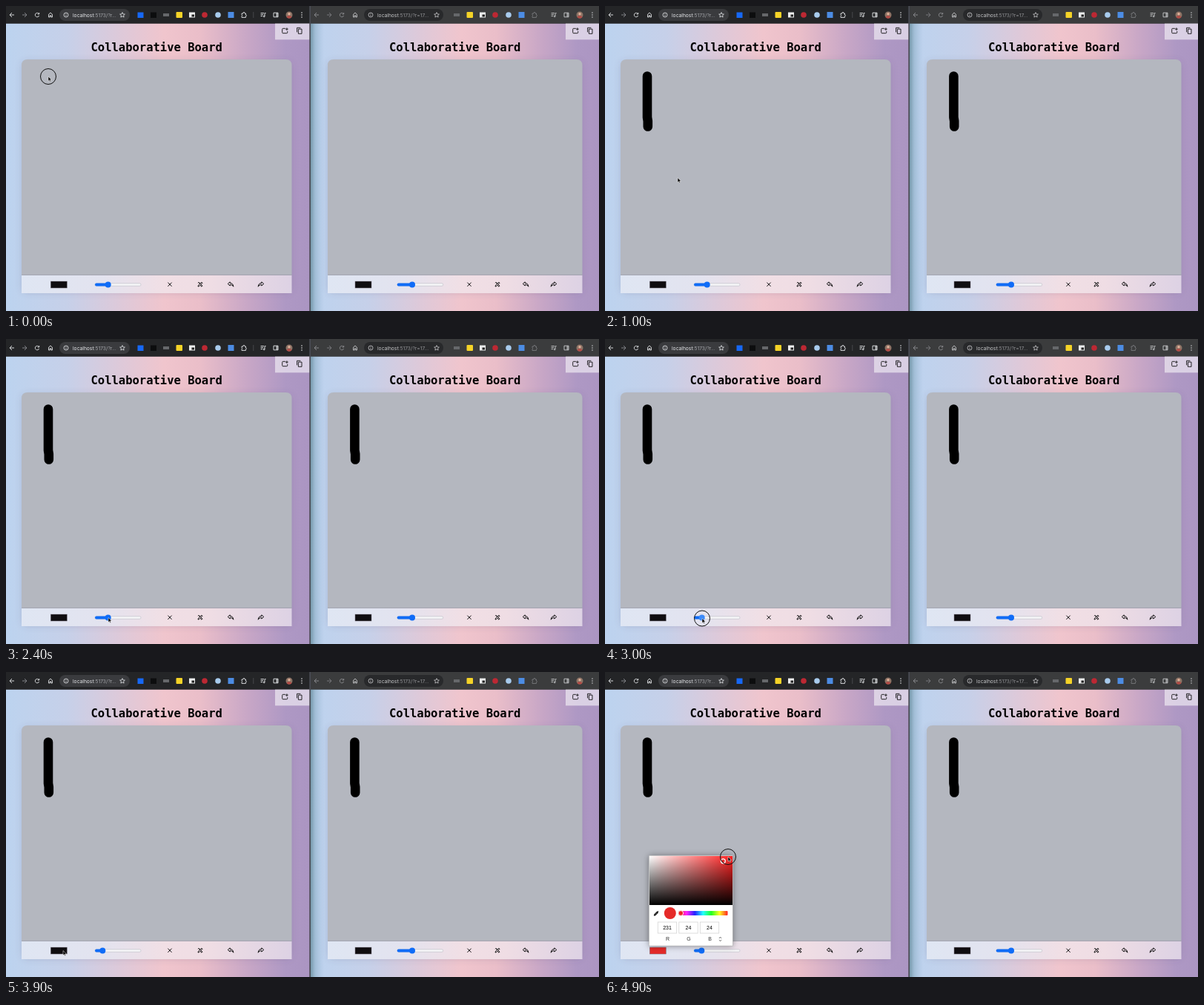
Write an HTML page that moves like this. It is 800 px wide and 411 px high and loops after 5 s.

```html
<!DOCTYPE html>
<html lang="en">
<head>
<meta charset="utf-8">
<title>Collaborative Board</title>
<style>
  html, body { margin: 0; width: 100%; height: 100%; overflow: hidden; background: #202124; }
  svg { display: block; width: 800px; height: 411px; }
  .title { font: bold 15.5px "DejaVu Sans Mono", monospace; text-anchor: middle; }
  .url { font: 6.7px Inter, sans-serif; }
  .field { font: 7px "Liberation Sans", Arial, sans-serif; text-anchor: middle; }
</style>
</head>
<body>
<svg id="stage" viewBox="0 0 800 411" xmlns="http://www.w3.org/2000/svg"></svg>
<script>
const ICONS = {
  back: 'M3 0H-3M0 -3L-3 0L0 3',
  forward: 'M-3 0H3M0 -3L3 0L0 3',
  reload: 'M2.4 -1.3A2.7 2.7 0 1 0 2.6 1M2.7 -3V-1H.7',
  home: 'M-2.4 3V-.8L0 -3L2.4 -.8V3H.8V.8H-.8V3Z',
  info: 'M-3 0A3 3 0 1 1 3 0A3 3 0 1 1 -3 0M0 -.3V1.7M0 -1.7V-1',
  star: 'M0 -3.4L1 -1.1L3.4 -.9L1.6 .7L2.1 3.1L0 1.8L-2.1 3.1L-1.6 .7L-3.4 -.9L-1 -1.1Z',
  puzzle: 'M-3 -2H-1V-2.6A1 1 0 0 1 1 -2.6V-2H2.4V0H2.8A1 1 0 0 1 2.8 1.8H2.4V3.4H-3V1.6A1 1 0 0 0 -3 -.2Z',
  media: 'M-3.4 -2.4H1M-3.4 -.4H0M-3.4 1.6H-1M2 2V-2.4H3.6M2 2A.9 .9 0 1 1 1.9 1.5',
  panel: 'M-3 -2.8H3V2.8H-3ZM1 -2.8V2.8M2 -2.8V2.8',
  close: 'M-2.6 -2.6L2.6 2.6M2.6 -2.6L-2.6 2.6',
  design: 'M-3 2.8L-2.4 1L2 -3L3 -2L-1.4 2.4ZM-3 -2L-2 -3L-.2 -1.2M1.3 .4L3 2L2 3L.3 1.4M-2 -1.2L-1.4 -1.8M1.6 2L2.2 1.4',
  undo: 'M-3.8 -.8L-.8 -3.4V-1.8C2 -1.8 3.6 -.2 3.8 3C2.8 1 1.4 .4 -.8 .4V1.8Z',
  redo: 'M3.8 -.8L.8 -3.4V-1.8C-2 -1.8 -3.6 -.2 -3.8 3C-2.8 1 -1.4 .4 .8 .4V1.8Z',
  share: 'M.6 -3H-2.6Q-3.6 -3 -3.6 -2V2.4Q-3.6 3.4 -2.6 3.4H2.4Q3.4 3.4 3.4 2.4V.6M2.6 -4V-.4M.8 -2.2H4.4',
  copy: 'M-1.6 -2.2H3V4H-1.6ZM-3.4 2V-4H1.4',
  dropper: 'M-3 3L-2.6 1.6L.6 -1.6L1.6 -.6L-1.6 2.6ZM.2 -2L2 -.2M1 -1.2L2.4 -2.6'
};

const icon = (name, x, y, color = '#111', width = .9) =>
  `<path d="${ICONS[name]}" transform="translate(${x} ${y})" fill="none" stroke="${color}" stroke-width="${width}" stroke-linejoin="round"/>`;
const rect = (x, y, w, h, fill, extra = '') =>
  `<rect x="${x}" y="${y}" width="${w}" height="${h}" fill="${fill}" ${extra}/>`;
const circle = (x, y, r, fill, extra = '') =>
  `<circle cx="${x}" cy="${y}" r="${r}" fill="${fill}" ${extra}/>`;
const text = (cls, x, y, body, fill = '#000') =>
  `<text class="${cls}" x="${x}" y="${y}" fill="${fill}">${body}</text>`;
const gradient = (id, colors, dir = '') =>
  `<linearGradient id="${id}" ${dir}>${colors.map(([at, c, o = 1]) =>
    `<stop offset="${at}" stop-color="${c}" stop-opacity="${o}"/>`).join('')}</linearGradient>`;

function browserBar(p) {
  const { x, w, pillW, ink, dim } = p;
  const end = x + w;
  let s = rect(x, 0, w, 23.5, p.bar);
  s += icon('back', x + 8, 12, p.navInk) + icon('forward', x + 25, 12, dim);
  s += icon('reload', x + 42, 12, p.navInk) + icon('home', x + 60, 12, ink);
  s += rect(x + 72, 4, pillW, 16, p.pill, 'rx="8"');
  s += icon('info', x + 81, 12, ink, .8);
  s += text('url', x + 90, 14.6, `localhost<tspan fill="${p.pathInk}">${p.path}</tspan>`, ink);
  s += icon('star', x + 64 + pillW + 21 - p.starShift, 12, ink, .8);

  const ext = p.ext;
  if (p.active) s += rect(177.5, 8.5, 8, 7.5, '#1668f5') + rect(195, 8.5, 8, 7.5, '#0c0d0e');
  s += rect(ext - 4, 10, 8, 4, '#66686b');
  s += rect(ext + 13.5, 8, 8.5, 8, '#f5d327', 'rx="1"');
  s += rect(ext + 31, 8.5, 8, 7, '#eceded') + rect(ext + 34.5, 11.5, 3.5, 3, '#222');
  s += circle(ext + 52, 12, 3.8, '#bd2833');
  s += circle(ext + 70, 12, 3.8, '#a8cbed');
  s += rect(ext + 83.5, 8, 8, 8, '#4c8ce4');
  s += icon('puzzle', ext + 105, 12, p.active ? ink : dim);
  if (p.active) s += rect(333.5, 8, .7, 8, '#55575b');
  s += icon('media', end - 63, 12, ink) + icon('panel', end - 46, 12, ink);
  s += circle(end - 28, 12, 4.5, '#8d7466') + circle(end - 28, 10.7, 1.7, '#e2b29b') +
       `<path d="M${end - 31.5} 15A3.7 3 0 0 1 ${end - 24.5} 15A4.5 4.5 0 0 1 ${end - 31.5} 15Z" fill="#b14b46"/>`;
  for (const y of [9, 12, 15]) s += circle(end - 11, y, .8, ink);
  return s;
}

function pane(p) {
  const { x, w, boardX: bx, boardW: bw, tools } = p;
  let s = rect(x, 23.5, w, 388, 'url(#page)');
  if (!p.active) s += rect(x, 23.5, 18, 388, 'url(#edge)');
  s += browserBar(p);
  s += rect(p.shareX, 23.5, x + w - p.shareX, 21.8, '#fff', 'fill-opacity=".55"');
  s += icon('share', p.shareX + 13.3, 33.3) + icon('copy', p.shareX + 33, 33.3);
  s += text('title', p.titleX, 61, 'Collaborative Board');
  s += rect(bx, 74, bw, 313, '#554c70', 'rx="8" fill-opacity=".2" filter="url(#soft)"');
  s += rect(bx, 363, bw, 24, 'url(#tray)');
  s += `<path d="M${bx} 362.5V80Q${bx} 72 ${bx + 8} 72H${bx + bw - 8}Q${bx + bw} 72 ${bx + bw} 80V362.5Z" fill="#b4b7bf"/>`;
  s += rect(bx, 361.8, bw, 1, '#a5a6b1');
  s += `<path id="${p.id}Line" transform="translate(${p.shift} 0)" fill="none" stroke="#000" stroke-width="12.6" stroke-linecap="round" stroke-linejoin="round"/>`;
  s += rect(p.swatchX, 371, 22, 9, '#0f0d10', `id="${p.id}Swatch" stroke="#77727c" stroke-width=".5"`);
  s += rect(p.slideX, 373.7, 62, 3.6, '#f4f4f6', 'rx="1.8" stroke="#bdbdc5" stroke-width=".6"');
  s += rect(p.slideX, 373.5, p.thumbX - p.slideX, 4, '#0f6cf7', `id="${p.id}Fill" rx="2"`);
  s += circle(p.thumbX, 375.5, 4, '#0f6cf7', `id="${p.id}Thumb"`);
  ['close', 'design', 'undo', 'redo'].forEach((n, i) => s += icon(n, tools[0] + i * tools[1], 375.2, '#111', 1));
  return s;
}

function picker() {
  let s = rect(59, 247.5, 113.5, 122, '#000', 'fill-opacity=".4" filter="url(#soft)"');
  s += rect(59.3, 247.3, 113, 121.7, '#fff', 'stroke="#aaa" stroke-width=".5"');
  s += rect(60, 248, 112, 66, 'url(#sat)') + rect(60, 248, 112, 66, 'url(#val)');
  s += circle(0, 0, 3, 'none', 'id="handle" stroke="#fff" stroke-width="1.2"');
  s += icon('dropper', 69.5, 325, '#111', 1.3);
  s += circle(87.8, 325, 8, '#000', 'id="preview"');
  s += rect(99, 322, 66.5, 6, 'url(#hue)', 'rx="1"');
  s += circle(102.2, 325, 3.4, '#ee2424', 'stroke="#fff" stroke-width=".9"');
  ['R', 'G', 'B'].forEach((c, i) => {
    const x = 84 + i * 28.5;
    s += rect(x - 12.7, 337, 25.4, 15, '#fff', 'stroke="#d5d5d5" stroke-width=".8"');
    s += `<text class="field channel" x="${x}" y="347"></text>` + text('field', x + .5, 362, c, '#333');
  });
  s += '<path d="M154 359L155.5 357L157 359M154 360.8L155.5 362.8L157 360.8" fill="none" stroke="#444" stroke-width=".7"/>';
  return `<g id="picker">${s}</g>`;
}

const left = {
  id: 'left', active: true, x: 0, w: 410, bar: '#242527', pill: '#3a3b3e', pillW: 95, starShift: 23,
  ink: '#e8eaed', navInk: '#e8eaed', dim: '#8b8d91', pathInk: '#a5a7ab', path: ':5173/?r...', ext: 216,
  shareX: 363, titleX: 203.2, boardX: 21, boardW: 364.5, shift: 0,
  swatchX: 60.3, slideX: 120, thumbX: 137.7, tools: [221, 41]
};
const right = {
  id: 'right', active: false, x: 411, w: 391, bar: '#3b3c3d', pill: '#28292b', pillW: 107, starShift: 22,
  ink: '#c9cacc', navInk: '#8f9093', dim: '#7b7c7f', pathInk: '#929396', path: ':5173/?r=17...', ext: 608,
  shareX: 755, titleX: 605.7, boardX: 434, boardW: 343.5, shift: 413.4,
  swatchX: 471, slideX: 527.7, thumbX: 548, tools: [625, 38]
};
// The address text sits slightly further left in the second window
right.x = 411;

const hues = ['#f22', '#f2f', '#22f', '#2ff', '#2f2', '#ff2', '#f22'];
const stage = document.getElementById('stage');
stage.innerHTML = `<defs>
  ${gradient('page', [[0, '#bcd3ef'], [.2, '#c6d0e9'], [.38, '#dec9d9'], [.52, '#f0c5cd'], [.64, '#eabec9'], [.8, '#c7a6c6'], [.92, '#ae98c4'], [1, '#ab95c2']])}
  ${gradient('tray', [[0, '#dfe6f3'], [.3, '#e3e3ef'], [.53, '#f1dfe5'], [.7, '#efdde4'], [1, '#ddd2e4']])}
  ${gradient('edge', [[0, '#47707c', .6], [.35, '#5b8798', .28], [1, '#7ba0b8', 0]])}
  ${gradient('sat', [[0, '#fff'], [1, '#ff2222']])}
  ${gradient('val', [[0, '#000', 0], [1, '#000']], 'x2="0" y2="1"')}
  ${gradient('hue', hues.map((c, i) => [i / 6, c]))}
  <filter id="soft" x="-20%" y="-20%" width="140%" height="140%"><feGaussianBlur stdDeviation="4"/></filter>
</defs>
${pane(right)}${pane(left)}${rect(409.3, 0, 1.7, 411, '#4a4c55')}${picker()}
${circle(0, 0, 10.5, 'none', 'id="ring" stroke="#111" stroke-width="1"')}
<path id="cursor" d="M0 0V6.2L1.5 4.9L2.5 7L3.5 6.5L2.6 4.5L4.5 4.4Z" fill="#000" stroke="#fff" stroke-width=".5"/>`;

const el = id => document.getElementById(id);
const set = (id, attrs) => { for (const k in attrs) el(id).setAttribute(k, attrs[k]); };
const show = (id, on) => set(id, { visibility: on ? 'visible' : 'hidden' });

// Pointer path: time, x, y
const PATH = [
  [0, 57, 95], [100, 57, 97], [500, 57, 150], [600, 58, 162.5], [700, 58, 162.5],
  [1000, 98, 231.5], [1900, 135.5, 365], [2300, 138, 375.5], [2500, 138, 375.5],
  [2900, 131, 376.5], [3200, 131, 376.5], [3800, 77, 375.5], [4100, 77, 375.5],
  [4300, 124.5, 293], [4700, 159, 254.5], [4900, 166, 249], [5000, 166, 249]
];
const PRESSES = [[0, 600], [2500, 3100], [4000, 4100], [4700, 5000]];

function pointer(t) {
  const i = PATH.findIndex(k => k[0] > t);
  const [t0, x0, y0] = PATH[i - 1], [t1, x1, y1] = PATH[i];
  const u = (t - t0) / (t1 - t0);
  return [x0 + (x1 - x0) * u, y0 + (y1 - y0) * u];
}

function strokeTo(t) {
  if (t < 100) return '';
  const y = t >= 600 ? 162.5 : pointer(t)[1];
  return 'M57 94.5V' + Math.min(y, 150) + (y > 150 ? `L57.8 ${Math.min(y, 155)}V${y}` : '');
}

function render(t) {
  const [x, y] = pointer(t);
  set('cursor', { transform: `translate(${x} ${y})` });
  set('ring', { cx: x, cy: y });
  show('ring', PRESSES.some(([a, b]) => t >= a && t < b));
  set('leftLine', { d: strokeTo(t) });
  set('rightLine', { d: strokeTo(t - 100) });

  const dragging = t >= 2500 && t < 3100;
  const thumb = t < 2500 ? 137.7 : dragging ? x - .3 : 130.3;
  set('leftThumb', { cx: thumb, fill: dragging ? '#3b8afa' : '#0f6cf7' });
  set('leftFill', { width: thumb - 120 });

  const picked = t >= 4800;
  const rgb = picked ? [231, 24, 24] : [0, 0, 0];
  const color = picked ? '#e52a28' : '#000';
  show('picker', t >= 4200);
  set('handle', picked ? { cx: 159.3, cy: 254.8 } : { cx: 60.5, cy: 313 });
  set('preview', { fill: color });
  set('leftSwatch', { fill: picked ? color : '#0f0d10' });
  document.querySelectorAll('.channel').forEach((n, i) => n.textContent = rgb[i]);
}

const start = performance.now();
function tick() {
  const t = Math.max(0, performance.now() - start) % 5000;
  render(Math.floor(t / 100) * 100);
  requestAnimationFrame(tick);
}
tick();
</script>
</body>
</html>
```
